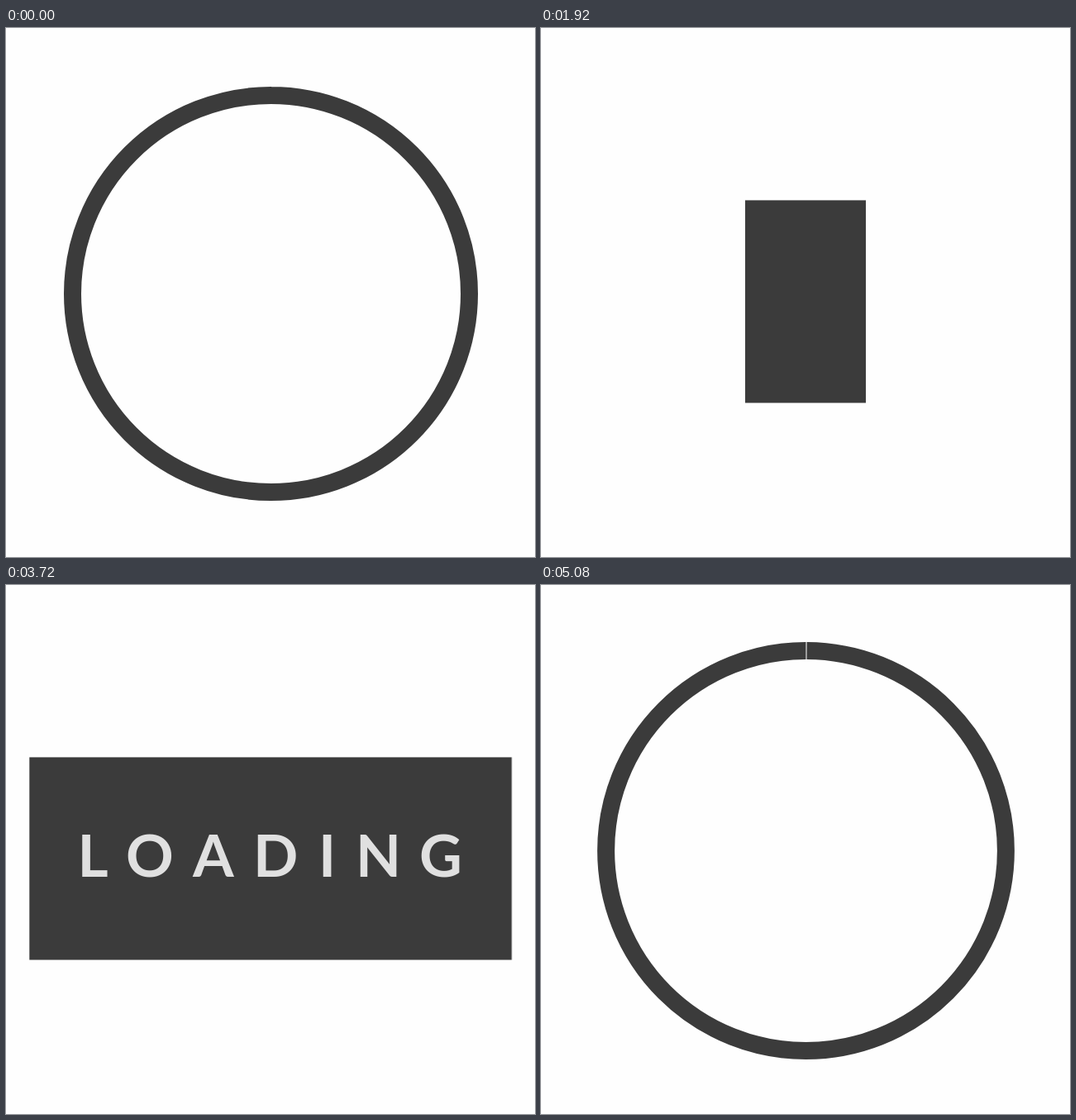
An HTML page for the animation above (5120 ms loop, 640 by 640 pixels).

```html
<!DOCTYPE html>
<html lang="en">
<head>
<meta charset="utf-8">
<title>Loading loop</title>
<style>
  @property --head { syntax: "<length>"; inherits: false; initial-value: 0px; }
  @property --tail { syntax: "<length>"; inherits: false; initial-value: 0px; }

  html, body { margin: 0; width: 100%; height: 100%; overflow: hidden; background: #fefefe; }
  svg { display: block; width: 100%; height: 100%; }

  .trail, .bar, .word, .word text { animation: 5120ms linear infinite both; }

  /* A dash running along the path from --tail to --head */
  .trail {
    fill: none;
    stroke: #3b3b3b;
    stroke-width: 21;
    stroke-dasharray: calc(var(--head) - var(--tail)) 9999px;
    stroke-dashoffset: calc(0px - var(--tail));
  }
  .leave { animation-name: leave-head, leave-tail, leave-show; }
  .enter { animation-name: enter-head, enter-tail, enter-show; }
  .trail { animation-timing-function: linear, linear, step-end; }

  @keyframes leave-head {
    0%, 1.5625% { --head: 1508px; animation-timing-function: cubic-bezier(.55, 0, .3, 1); }
    34.375%, 100% { --head: 4060px; }
  }
  @keyframes leave-tail {
    0%, 1.5625% { --tail: 0px; animation-timing-function: cubic-bezier(.34, 0, .33, 1); }
    34.375%, 100% { --tail: 3812px; }
  }
  @keyframes leave-show {
    0% { opacity: 1; }
    34.766%, 100% { opacity: 0; }
  }

  @keyframes enter-head {
    0%, 76.5625% { --head: 248px; animation-timing-function: cubic-bezier(.56, 0, .53, 1); }
    99.609%, 100% { --head: 3350px; }
  }
  @keyframes enter-tail {
    0%, 76.5625% { --tail: 0px; animation-timing-function: cubic-bezier(.6, 0, .7, 1); }
    94.14%, 100% { --tail: 1828.5px; }
  }
  @keyframes enter-show {
    0% { opacity: 0; }
    76.5625%, 100% { opacity: 1; }
  }

  .bar {
    fill: #3b3b3b;
    transform-box: fill-box;
    transform-origin: center;
    animation-name: bar-width, bar-show;
    animation-timing-function: linear, step-end;
  }
  @keyframes bar-width {
    0%, 34.766% { transform: scaleX(.0355); animation-timing-function: cubic-bezier(.5, 0, .4, 1); }
    43.36% { transform: scaleX(1.0355); animation-timing-function: ease-in-out; }
    45.3125%, 72.266% { transform: none; animation-timing-function: cubic-bezier(.5, 0, .5, 1); }
    76.5625%, 100% { transform: scaleX(.0355); }
  }
  @keyframes bar-show {
    0% { opacity: 0; }
    34.766% { opacity: 1; }
    76.5625%, 100% { opacity: 0; }
  }

  .word { animation-name: word-fade; }
  @keyframes word-fade {
    0%, 40% { opacity: 0; }
    40.1%, 72.266% { opacity: 1; }
    75%, 100% { opacity: 0; }
  }
  .word text {
    font: 700 71.5px Lato, sans-serif;
    fill: #fefefe;
    animation-name: rise;
  }
  @keyframes rise {
    0%, 42.969% { opacity: 0; transform: translateY(30px); animation-timing-function: cubic-bezier(.3, .45, .65, 1); }
    46.094%, 100% { opacity: 1; transform: none; }
  }
</style>
</head>
<body>
<svg viewBox="0 0 640 640">
  <!-- two and a quarter laps from the top, then a hook up into the upright -->
  <path class="trail leave" d="M320.5 81.5
    a240 240 0 0 1 0 480 a240 240 0 0 1 0 -480
    a240 240 0 0 1 0 480 a240 240 0 0 1 0 -480
    a240 240 0 0 1 240 240
    A150 213.5 0 0 1 410.5 535 A90 100 0 0 1 320.5 435 V206"/>
  <!-- the upright, a hook over to the right, then back round to the top -->
  <path class="trail enter" d="M320.5 454 V206
    A90 100 0 0 1 410.5 106 A152 215.5 0 0 1 562.5 321.5
    a242 242 0 0 1 -242 242 a242 242 0 0 1 0 -484
    a242 242 0 0 1 0 484 a242 242 0 0 1 0 -484"/>
  <rect class="bar" x="24.4" y="208.4" width="591.2" height="245.2"/>
  <g class="word"></g>
</svg>
<script>
  const word = document.querySelector(".word");
  const pen = document.createElement("canvas").getContext("2d");
  pen.font = "700 71.5px Lato, sans-serif";

  // Left ink edge of each letter
  const edges = [91.5, 147, 225, 304, 383, 428, 502];

  [..."LOADING"].forEach((char, i) => {
    const letter = document.createElementNS("http://www.w3.org/2000/svg", "text");
    letter.textContent = char;
    letter.setAttribute("x", edges[i] + pen.measureText(char).actualBoundingBoxLeft);
    letter.setAttribute("y", 352.5);
    letter.style.animationDelay = `${i * 80}ms`;
    word.append(letter);
  });
</script>
</body>
</html>
```
